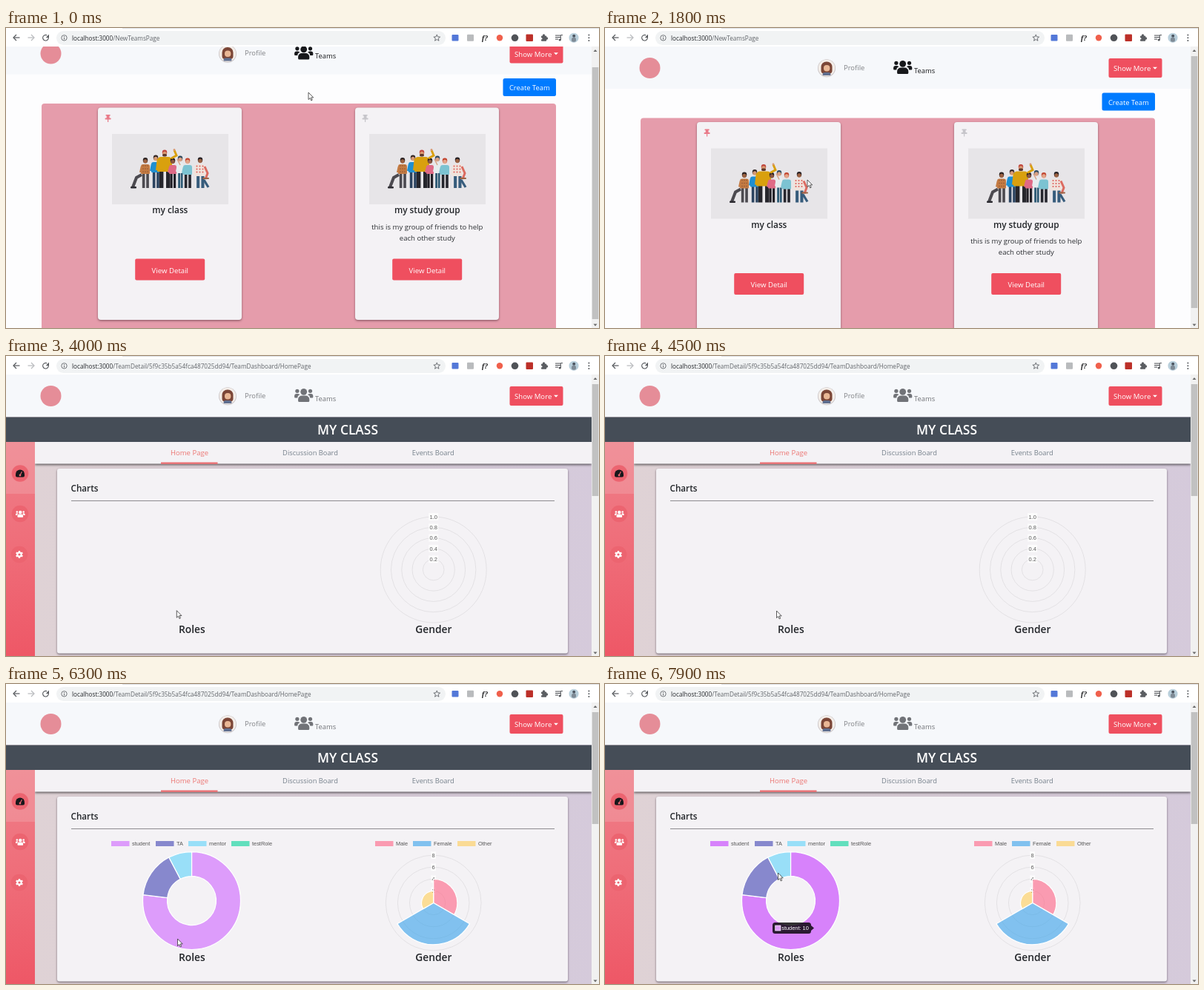
Animation, 800 px wide and 405 px high, one loop 8 s. Source, as an HTML page with a canvas:

```html
<!DOCTYPE html>
<html lang="en">
<head>
<meta charset="utf-8">
<title>Team pages</title>
<style>
html, body { margin: 0; width: 100%; height: 100%; overflow: hidden; background: #fff; }
canvas { display: block; width: 800px; height: 405px; }
</style>
</head>
<body>
<canvas id="stage"></canvas>
<script>
const canvas = document.getElementById('stage');
const c = canvas.getContext('2d');
const dpr = window.devicePixelRatio || 1;
canvas.width = 800 * dpr;
canvas.height = 405 * dpr;

const LOOP = 8000, STEP = 100;
const UI = '"Open Sans", "Noto Sans", sans-serif';
const CHART = '"Liberation Sans", Arial, sans-serif';
const RED = '#ef4f5f', PANEL = '#f4f2f5', TAU = Math.PI * 2, TOP = -Math.PI / 2;

const NAV_AT = 4000, DATA_AT = 4600, TIP_AT = 6870;
const HOST = 'localhost:3000';
const TEAM = '/TeamDetail/5f9c35b5a54fca487025dd94/';

// time, x, y
const MOUSE = [[0, 408, 87], [900, 408, 87], [1800, 273, 205], [2000, 273, 205],
  [2600, 228, 343], [3700, 228, 343], [4200, 231.5, 344], [6500, 231.5, 344],
  [6900, 309.5, 287], [7200, 309.5, 287], [7900, 233.5, 255]];

const clamp = v => Math.max(0, Math.min(1, v));
const smooth = v => { v = clamp(v); return v * v * (3 - 2 * v); };
const outQuart = v => 1 - Math.pow(1 - clamp(v), 4);

function box(x, y, w, h, fill, r = 0) {
  c.beginPath();
  c.roundRect(x, y, w, h, r);
  c.fillStyle = fill;
  c.fill();
}

function disc(x, y, r, fill) {
  c.beginPath();
  c.arc(x, y, r, 0, TAU);
  c.fillStyle = fill;
  c.fill();
}

function ring(x, y, r, color, width) {
  c.beginPath();
  c.arc(x, y, r, 0, TAU);
  c.strokeStyle = color;
  c.lineWidth = width;
  c.stroke();
}

function poly(points, fill, stroke, width = 1, open = false) {
  c.beginPath();
  points.forEach(([x, y]) => c.lineTo(x, y));
  if (!open) c.closePath();
  if (fill) { c.fillStyle = fill; c.fill(); }
  if (stroke) { c.strokeStyle = stroke; c.lineWidth = width; c.stroke(); }
}

const line = (points, color, width) => poly(points, null, color, width, true);

function text(str, x, y, size, color, align = 'left', weight = 400, family = UI) {
  c.font = `${weight} ${size}px ${family}`;
  c.textAlign = align;
  c.fillStyle = color;
  c.fillText(str, x, y);
}

function shadowed(blur, dy, color, paint) {
  c.save();
  c.shadowColor = color;
  c.shadowBlur = blur * dpr;
  c.shadowOffsetY = dy * dpr;
  paint();
  c.restore();
}

function at(x, y, scale, paint) {
  c.save();
  c.translate(x, y);
  c.scale(scale, scale);
  paint();
  c.restore();
}

// Group icon centred on 0,0 and 25 wide
function group(x, y, scale, color, back) {
  at(x, y, scale, () => {
    for (const side of [-1, 1]) {
      disc(side * 8.8, -5.7, 2.6, color);
      box(side * 8.9 - 3.7, -2, 7.4, 5.6, color, [3, 3, 1, 1]);
    }
    disc(0, -4.7, 5.1, back);
    box(-8.4, -.6, 16.8, 10, back, 4);
    disc(0, -4.7, 4.4, color);
    box(-7.6, .5, 15.2, 8.6, color, [5, 5, 1.5, 1.5]);
  });
}

function toolbar(url) {
  box(0, 0, 800, 25, '#fff');
  box(157, 0, 643, 1, '#dcdfe3');
  box(68, 4, 525, 19, '#f1f3f4', 9.5);
  line([[18.5, 13], [10, 13]], '#55585c', 1.2);
  line([[14, 9], [10, 13], [14, 17]], '#55585c', 1.2);
  line([[29.5, 13], [38, 13]], '#b8babd', 1.2);
  line([[34, 9], [38, 13], [34, 17]], '#b8babd', 1.2);
  c.beginPath();
  c.arc(53.5, 13.2, 3.8, -.4, 5.2);
  c.strokeStyle = '#55585c';
  c.lineWidth = 1.2;
  c.stroke();
  poly([[58, 8.5], [58, 13], [53.8, 13]], '#55585c');
  ring(78.5, 13.3, 3.7, '#65686c', .9);
  box(78, 12.7, 1, 2.8, '#65686c');
  box(78, 10.9, 1, 1, '#65686c');
  text(HOST, 89, 16.5, 8.2, '#26292d');
  const w = c.measureText(HOST).width;
  text(url, 89 + w, 16.5, 8.2, '#62666b');

  const star = [];
  for (let i = 0; i < 10; i++) {
    const r = i % 2 ? 2 : 4.6, a = TOP + i * TAU / 10;
    star.push([581.3 + r * Math.cos(a), 13.5 + r * Math.sin(a)]);
  }
  poly(star, null, '#5f6368', .9);
  box(601.5, 9, 9, 8.5, '#5378d8', 1);
  box(622, 8.7, 9, 9, '#b9bbbd', 1);
  text('f?', 642, 17, 10, '#17181a', 'left', 'italic 700', '"Liberation Serif", serif');
  disc(666, 13.3, 4.2, '#f0604c');
  disc(686.5, 13.3, 4.8, '#505358');
  box(701.5, 8.5, 9.5, 9.5, '#bc3029', 1);
  box(722, 10.5, 7.2, 7.2, '#5b5e62', 1);
  disc(725.5, 10, 1.7, '#5b5e62');
  disc(729.5, 14, 1.7, '#5b5e62');
  disc(722.2, 14.2, 1.2, '#fff');
  [10, 12.5, 15].forEach((y, i) => box(741, y - .5, i > 1 ? 4 : 7, 1.1, '#55585c'));
  disc(747.2, 16, 1.6, '#55585c');
  line([[748.4, 16], [748.4, 9.5], [751, 9.5]], '#55585c', 1);
  disc(766, 13.2, 6.5, '#b9cfdb');
  disc(766.2, 10.8, 2, '#4c5560');
  box(763, 12.8, 6, 6, '#7f8b96', 2.5);
  for (const y of [9.5, 13.2, 16.9]) disc(786.4, y, 1, '#55585c');
}

function scrollbar(y, h) {
  box(790, 25, 10, 380, '#f1f1f1');
  box(790.7, y, 8.6, h, '#c1c1c1');
  poly([[792.5, 32], [797.5, 32], [795, 29]], '#6a6a6a');
  poly([[792.5, 399.5], [797.5, 399.5], [795, 402.5]], '#6a6a6a');
}

function navbar(teamColor) {
  box(0, 20, 790, 62, '#f6f8fb');
  disc(60.5, 54, 14, '#e58d98');
  disc(299, 54.3, 12, '#c9c4c6');
  disc(299, 54, 11.2, '#f4eee9');
  box(291.5, 45.5, 15, 16, '#7b4637', [7, 7, 4, 4]);
  box(295, 50, 8.4, 8.6, '#e9b795', 4);
  box(293.5, 60, 11, 4, '#5e6e8f', [3, 3, 1, 1]);
  text('Profile', 322, 56.5, 9.45, '#808286');
  group(401.7, 53, 1, teamColor, '#f6f8fb');
  text('Teams', 417, 60.5, 9.4, teamColor);
  box(679.5, 41, 72, 26, RED, 2);
  text('Show More', 686, 58, 9.6, '#fff');
  poly([[739, 52.7], [745, 52.7], [742, 55.8]], '#fff');
}

// x, head y, shoulder y, hip y, half width, skin, hair, top, bottom
const PEOPLE = [
  [71, 25, 30, 49, 7, '#c78b65', '#3b2a28', '#4e7fa5', '#34323b'],
  [59, 33, 38, 52, 6, '#d59a75', '#332624', '#1f8fd1', '#2d4561'],
  [45, 36.5, 41, 54, 6, '#9b6142', '#2b2222', '#c47b43', '#4c4a50'],
  [71, 26, 31, 51, 10, '#d99a72', '#c0453c', '#d9a00e', '#26262c'],
  [82, 37, 42, 54, 5, '#8d5740', '#1f1b20', '#df6a86', '#222027'],
  [92, 34, 39, 53, 4, '#d9a184', '#2d4a60', '#e6ecee', '#2b5873'],
  [102, 37, 42, 55, 6, '#e2a58a', '#c2442f', '#7cc3d2', '#27272e'],
  [119, 36, 41, 57, 7, '#9b6142', '#241f23', '#f0e3dc', '#375c7c']
];

function crew() {
  for (const [x, hy, sy, hip, w, skin, hair, top, legs] of PEOPLE.slice(1)) {
    const lw = w * .44;
    box(x - w * .7, hip - 1, lw + 1, 74 - hip, legs);
    box(x + w * .2, hip - 1, lw + 1, 74 - hip, legs);
    box(x - w, sy, w * 2, hip - sy, top, [w * .5, w * .5, 1, 1]);
    line([[x - w + .7, sy + 3], [x - w - 1, hip - 2]], top, 2);
    box(x - 3.2, hy - 4.5, 6.4, 7, hair, 3);
    disc(x, hy + .5, 2.7, skin);
  }
  line([[80, 33], [87, 29], [84, 22]], '#d9a00e', 3);
  disc(84, 21.5, 1.4, '#d99a72');
  line([[92, 42], [88, 34]], '#d9a184', 1.6);
  box(68, 27, 6, 3.5, '#5d382b', 2);
  line([[40, 55], [33, 59], [28, 72]], '#4c4a50', 4);
  box(25, 71, 8, 2.5, '#2b2a30', 1);
  for (let i = 0; i < 9; i++) {
    disc(114.5 + i % 3 * 4, 43.5 + Math.floor(i / 3) * 4, 1, '#dd5e59');
    disc(42 + i % 3 * 3, 43 + Math.floor(i / 3) * 4, .7, '#855036');
  }
  line([[125, 44], [129, 53], [126, 61]], '#dc6b60', 3);
  box(122, 59, 9, 2, '#9b6142', 1);
  line([[124, 62], [130, 72]], '#375c7c', 3.2);
}

function card(x, title, lines, pin, button) {
  shadowed(3, 1.2, 'rgba(60,30,40,.55)', () => box(x, 127, 194, 286.5, PANEL, 4));
  box(x + 10.5, 136.5, 6.2, 1.6, pin, .5);
  box(x + 11.7, 137.5, 3.8, 4, pin);
  box(x + 9.5, 141, 8.2, 2, pin, 1);
  box(x + 13, 142.5, 1.2, 4, pin);
  box(x + 19, 162.5, 157, 95, '#e7e5e8');
  at(x + 19, 162.5, 1, crew);
  const mid = x + 97.3;
  text(title, mid, 269.7, 11.8, '#222529', 'center', 600);
  lines.forEach((s, i) => text(s, mid, 291 + i * 15, 9.6, '#2c2f33', 'center'));
  box(x + 50.2, 331, 94, 29, button, 2);
  text('View Detail', mid, 350, 9.65, '#fff', 'center');
}

function teamsPage(t) {
  const scroll = 19.5 * (1 - smooth((t - 200) / 500));
  box(0, 25, 790, 380, '#fdfdfe');
  c.save();
  c.beginPath();
  c.rect(0, 25, 790, 380);
  c.clip();
  c.translate(0, -scroll);
  navbar('#17181b');
  box(670.5, 87.5, 71.5, 24, '#007bff', 2.5);
  text('Create Team', 706.3, 103.6, 9.4, '#fff', 'center');
  box(48, 121.5, 694, 420, '#e59cab', 4);
  card(124, 'my class', [], '#e97a89', t >= 2500 ? '#f1717f' : RED);
  card(471, 'my study group',
    ['this is my group of friends to help', 'each other study'], '#c6c5ca', RED);
  c.restore();
  scrollbar(38 + scroll * .77, 340);
  if (t >= 2800) {
    box(-2, 391.7, 268.5, 15, '#c3c6ca', [0, 3, 0, 0]);
    box(-2, 392.5, 267.6, 15, '#dee1e6', [0, 3, 0, 0]);
    text(HOST + TEAM + '.../HomePage', 5, 401.7, 7, '#4b4f54');
  }
}

function sidebar() {
  const g = c.createLinearGradient(0, 116, 39, 405);
  g.addColorStop(0, '#ef7f89');
  g.addColorStop(.5, '#ef6d79');
  g.addColorStop(1, '#ee5766');
  box(0, 116, 39, 289, g);
  box(0, 116, 39, 70, 'rgba(240,190,195,.28)');
  [158.5, 213, 268].forEach((y, i) => disc(19 - (i > 1), y, 11.3, '#ec6470'));
  box(13, 153.5, 12, 10, '#17171a', [6, 6, 2, 2]);
  line([[19, 161], [21.5, 156]], '#ec6470', 1.1);
  disc(19, 161, 1.4, '#ec6470');
  group(19.3, 213.3, .5, '#fff', '#ec6470');
  for (let i = 0; i < 6; i++) {
    const a = i * TAU / 6 + TOP;
    line([[18, 268], [18 + 5 * Math.cos(a), 268 + 5 * Math.sin(a)]], '#fff', 2.2);
  }
  disc(18, 268, 3.7, '#fff');
  disc(18, 268, 1.6, '#ec6470');
}

function legend(items, y) {
  for (const [x, label, color] of items) {
    box(x, y - 3.5, 24.5, 7, color);
    text(label, x + 28, y + 2.5, 7.4, '#555', 'left', 400, CHART);
  }
}

function rings(x, y, step, labels) {
  labels.forEach((s, i) => ring(x, y, step * (i + 1), 'rgba(0,0,0,.1)', .7));
  labels.forEach((s, i) => {
    const ty = y - step * (i + 1);
    c.font = `7.5px ${CHART}`;
    const w = c.measureText(s).width + 2.5;
    box(x - w / 2, ty - 5, w, 10, 'rgba(255,255,255,.75)');
    text(s, x, ty + 2.7, 7.5, '#5c5c5c', 'center', 400, CHART);
  });
}

function slice(x, y, r0, r1, a0, a1, fill) {
  if (a1 - a0 < 1e-4 || r1 <= 0) return;
  c.beginPath();
  c.arc(x, y, r1, a0, a1);
  c.arc(x, y, r0, a1, a0, true);
  c.closePath();
  c.fillStyle = fill;
  c.fill();
  c.strokeStyle = '#fff';
  c.lineWidth = 1.25;
  c.stroke();
}

function rolesChart(p, hot) {
  const student = `rgb(${221 - 6 * hot},${156 - 26 * hot},251)`;
  legend([[142, 'student', student], [202, 'TA', '#8788cd'],
    [246, 'mentor', '#99dff8'], [304, 'testRole', '#62dfbd']], 215.5);
  let a = TOP;
  [[10, student], [2, '#8788cd'], [1, '#99dff8']].forEach(([n, fill]) => {
    const end = a + n / 13 * TAU * p;
    slice(250.5, 292.5, 33, 66, a, end, fill);
    a = end;
  });
}

function genderChart(p) {
  const hues = ['rgba(255,99,132,.6)', 'rgba(54,162,235,.6)', 'rgba(255,206,86,.6)'];
  legend([[498, 'Male', hues[0]], [549, 'Female', hues[1]], [609, 'Other', hues[2]]], 215.5);
  rings(576.7, 295.5, 16.1, ['2', '4', '6', '8']);
  [4, 7, 2].forEach((n, i) => slice(576.7, 295.5, 0, n * 8.05 * p,
    TOP + p * i * TAU / 3, TOP + p * (i + 1) * TAU / 3, hues[i]));
}

function tooltip(alpha) {
  c.save();
  c.globalAlpha = alpha;
  box(226, 322, 52, 15, 'rgba(0,0,0,.8)', 3.5);
  poly([[278, 326], [282, 329.5], [278, 333]], 'rgba(0,0,0,.8)');
  box(229.3, 325.7, 8, 7.6, '#fff');
  box(230, 326.4, 6.6, 6.2, '#dd9cfb');
  text('student: 10', 238.2, 332.3, 7.4, '#fff', 'left', 400, CHART);
  c.restore();
}

function detailPage(t) {
  const bg = c.createLinearGradient(39, 0, 790, 0);
  bg.addColorStop(0, '#dfd2d5');
  bg.addColorStop(1, '#d5cadb');
  box(0, 25, 790, 380, bg);
  navbar('#717378');
  shadowed(3, 1.2, 'rgba(0,0,0,.6)', () => box(39, 116, 751, 29.5, PANEL));
  box(0, 82.5, 790, 33.5, '#454d57');
  text('MY CLASS', 461, 106, 17.4, '#fff', 'center', 600);
  sidebar();
  text('Home Page', 247.5, 134, 9.5, '#ec7673', 'center');
  text('Discussion Board', 410.5, 134, 9.3, '#75808b', 'center');
  text('Events Board', 576.3, 134, 9.3, '#75808b', 'center');
  box(209, 143.5, 76.5, 2.3, '#ec6d70');

  shadowed(3, 1.2, 'rgba(40,30,45,.6)', () => box(69, 152, 689, 249.5, PANEL, 3));
  text('Charts', 87.5, 183, 11.7, '#222529', 'left', 600);
  box(88, 195, 652, .9, '#8d8c90');
  if (t < DATA_AT) {
    rings(576.7, 288.5, 14.3, ['0.2', '0.4', '0.6', '0.8', '1.0']);
  } else {
    const p = outQuart((t - DATA_AT) / 1000);
    const hot = outQuart((t - TIP_AT) / 400);
    rolesChart(p, hot);
    genderChart(p);
    if (hot > 0) tooltip(hot);
  }
  text('Roles', 250.8, 374, 13.8, '#222529', 'center', 600);
  text('Gender', 576.8, 374, 13.8, '#222529', 'center', 600);
  scrollbar(38, 151);
}

function mousePos(t) {
  let i = 1;
  while (i < MOUSE.length - 1 && t > MOUSE[i][0]) i++;
  const [t0, x0, y0] = MOUSE[i - 1], [t1, x1, y1] = MOUSE[i];
  const k = smooth((t - t0) / (t1 - t0));
  return [x0 + (x1 - x0) * k, y0 + (y1 - y0) * k];
}

function cursor(t) {
  const [x, y] = mousePos(t);
  at(x, y, 1, () => {
    c.lineJoin = 'round';
    if (t >= 2500 && t < NAV_AT) {
      poly([[-.8, .6], [0, 0], [.9, .6], [.9, 4], [5.2, 5], [6, 6], [5.6, 9.5],
        [4.6, 12.5], [-.3, 12.5], [-3.2, 8], [-3, 6.9], [-2, 6.8], [-.8, 8]],
        '#fff', '#222', .9);
    } else {
      poly([[0, 0], [0, 9.6], [2.2, 7.5], [3.7, 10.9], [5.2, 10.2], [3.7, 6.9], [6.7, 6.9]],
        '#fff', '#333', .8);
    }
  });
}

function draw(t) {
  c.setTransform(dpr, 0, 0, dpr, 0, 0);
  c.lineJoin = 'miter';
  const detail = t >= NAV_AT;
  if (detail) detailPage(t); else teamsPage(t);
  toolbar(detail ? TEAM + 'TeamDashboard/HomePage' : '/NewTeamsPage');
  cursor(t);
}

const start = performance.now();
function tick() {
  const t = (performance.now() - start) % LOOP;
  draw(Math.floor(t / STEP) * STEP);
  requestAnimationFrame(tick);
}
tick();
</script>
</body>
</html>
```
